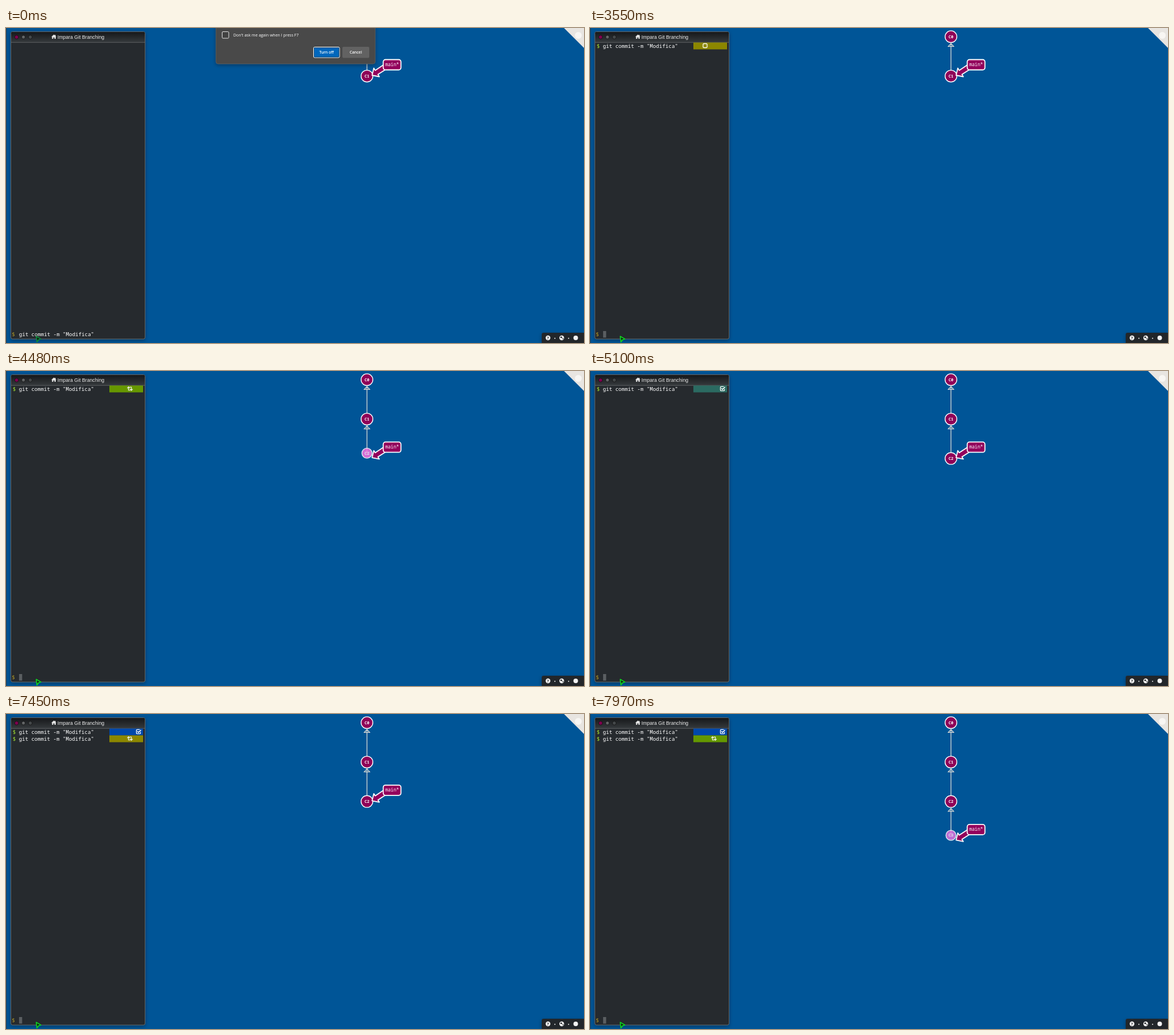
Animation, 1012 px wide and 553 px high, one loop 8 s. Source, as an HTML page:

```html
<!DOCTYPE html>
<html lang="it">
<head>
<meta charset="utf-8">
<title>Impara Git Branching</title>
<style>
  html, body { margin: 0; width: 100%; height: 100%; overflow: hidden; background: #005597; }
  svg { display: block; width: 1012px; height: 553px; }
  text { white-space: pre; }
  .mono { font: 500 9.13px "Noto Sans Mono", "DejaVu Sans Mono", monospace; fill: #fff; }
  .tag { font-size: 8px; text-anchor: middle; }
  .commit { font-size: 7px; font-weight: 700; text-anchor: middle; }
  .title { font: 8.7px "Liberation Sans", Arial, sans-serif; fill: #eee; }
  .ui { font: 7px "Open Sans", "Noto Sans", sans-serif; fill: #fff; }
  .btn { font-size: 6.7px; font-weight: 600; text-anchor: middle; }
  .line { fill: none; stroke: #fff; stroke-width: 1.3; }
</style>
</head>
<body>
<svg viewBox="0 0 1012 553">
  <defs>
    <linearGradient id="bar" x2="0" y2="1">
      <stop offset="0" stop-color="#16181a"/>
      <stop offset="1" stop-color="#35393c"/>
    </linearGradient>
    <filter id="shadow" x="-20%" y="-20%" width="140%" height="150%">
      <feDropShadow dx="0" dy="2" stdDeviation="3" flood-opacity=".35"/>
    </filter>
    <g id="retweet" fill="none" stroke="#e8ead8" stroke-width="1.4">
      <path d="M-2.5-3V2.6H.6M-4.6-.8L-2.5-3.2L-.4-.8M2.5 3V-2.6H-.6M4.6 .8L2.5 3.2L.4 .8"/>
    </g>
    <rect id="square" class="line" x="-3.5" y="-3.5" width="7" height="7" rx="1.3"/>
    <g id="check" class="line">
      <path d="M3.4 .4V2.4Q3.4 3.6 2.2 3.6H-2.4Q-3.6 3.6-3.6 2.4V-2.4Q-3.6-3.6-2.4-3.6H2.2"/>
      <path d="M-2-.6L0 1.3L4.4-3" stroke-width="1.6"/>
    </g>
  </defs>

  <rect width="1012" height="553" fill="#005597"/>
  <rect width="1.5" height="553" fill="#1b4263"/>

  <g id="tree">
    <g id="edges"></g>
    <g id="nodes"></g>
    <g id="branch" stroke="#fff" stroke-width="1.8" stroke-linejoin="round">
      <path fill="#93005c" d="M641 83L644 70.5L646.4 74.4L662 64L666 72L651.2 81.6L653.6 85.5Z"/>
      <rect x="660.5" y="55.5" width="31" height="18" rx="4" fill="#93005c"/>
      <text class="mono tag" x="676" y="67" stroke="none">main*</text>
    </g>
  </g>

  <!-- terminal -->
  <rect x="8.5" y="6.5" width="235" height="539.5" rx="3" fill="#262a2d" stroke="#65686a" filter="url(#shadow)"/>
  <path d="M9 25V9Q9 7 11 7H241Q243 7 243 9V25Z" fill="url(#bar)"/>
  <path d="M9 25.3H243" stroke="#5c6062"/>
  <g stroke="#111" stroke-width=".8">
    <circle cx="18.5" cy="16" r="3.3" fill="#80004f"/>
    <circle cx="30.5" cy="16" r="3.3" fill="#55585a"/>
    <circle cx="42.5" cy="16" r="3.3" fill="#44484a"/>
  </g>
  <path d="M30.5 14.5V17M28.8 15.5H32.2" stroke="#777" stroke-width=".8"/>
  <path d="M79.3 15.6L83.8 11.5L85.6 13.1V12H86.8V14.2L88.4 15.6H87V19H84.8V16.5H82.8V19H80.6V15.6Z" fill="#e6e6e6"/>
  <text class="title" x="90" y="18.8">Impara Git Branching</text>
  <g id="log"></g>

  <text class="mono" x="10.2" y="541" style="fill:#b39a28">$</text>
  <text class="mono" id="prompt" x="22.7" y="541"></text>
  <rect id="caret" y="532" width="5.4" height="11.5" fill="#5a5e61"/>

  <path id="arrow" d="M53 541.3L61 546L57 547.4L54.2 551.2Z" fill="#101a12" stroke-width="1.8" stroke-linejoin="round"/>
  <path id="beam" d="M49.5 534.8Q52.5 534.8 52.9 536.5Q53.3 534.8 56.3 534.8M52.9 536V546M49.5 547.2Q52.5 547.2 52.9 545.5Q53.3 547.2 56.3 547.2" fill="none" stroke="#10c820" stroke-width="1.8"/>

  <!-- corner ribbon and footer -->
  <path d="M977 0H1012V35Z" fill="#e8e5e1"/>
  <circle cx="1002" cy="13" r="6" fill="#f8f6f3"/>
  <path d="M938 553V538Q938 535 941 535H1012V553Z" fill="#24282b" filter="url(#shadow)"/>
  <g fill="#f2f2f2">
    <circle cx="949" cy="544" r="4.2"/>
    <circle cx="973" cy="544" r="4.2"/>
    <circle cx="997.5" cy="544" r="4"/>
    <circle cx="961" cy="544.8" r="1"/>
    <circle cx="985" cy="544.8" r="1"/>
  </g>
  <text class="ui" x="949" y="546.6" style="fill:#24282b;font-weight:700;text-anchor:middle">?</text>
  <path d="M970.5 542L973 541.6L974 543.2L972.4 544.6L970.6 544ZM974.6 544.4L976.2 544L975.4 546.6L974.2 546.4Z" fill="#24282b"/>

  <g id="dialog">
    <rect x="367.5" y="-20" width="279" height="83" rx="4" fill="#4a4a4a" stroke="#5c5f62" stroke-width=".8" filter="url(#shadow)"/>
    <rect x="378.5" y="6.5" width="11.5" height="11.5" rx="1.5" fill="#424242" stroke="#e4e4e4"/>
    <text class="ui" x="398" y="15">Don't ask me again when I press F7</text>
    <rect x="538.5" y="33.5" width="45.5" height="18.5" rx="2" fill="#0067bd" stroke="#fff"/>
    <rect x="539.5" y="34.5" width="43.5" height="16.5" rx="1" fill="none" stroke="#24405a" stroke-width=".8"/>
    <rect x="589" y="33" width="47" height="19.5" rx="2" fill="#626262"/>
    <text class="ui btn" x="561.2" y="45.3">Turn off</text>
    <text class="ui btn" x="612.4" y="45.3">Cancel</text>
  </g>
</svg>

<script>
const LOOP = 8000, X = 632, TOP = 15.2, GAP = 69.2, RADIUS = 10.3;
const CHAR = 5.478, COMMAND = 'git commit -m "Modifica"';
const MAIN = [143, 0, 88];
const OLIVE = [140, 135, 0], GREEN = [100, 152, 0], BLUE = [0, 72, 170];

const $ = id => document.getElementById(id);
const make = (parent, tag, attrs, text = '') => {
  const el = document.createElementNS('http://www.w3.org/2000/svg', tag);
  set(el, attrs);
  el.textContent = text;
  return parent.appendChild(el);
};
const set = (el, attrs) => {
  for (const key in attrs) el.setAttribute(key, attrs[key]);
};
const show = (el, on) => { el.style.display = on ? '' : 'none'; };
const clamp = v => Math.min(1, Math.max(0, v));
const mix = (a, b, p) => a + (b - a) * p;
const blend = (a, b, p) => `rgb(${a.map((v, i) => Math.round(mix(v, b[i], p)))})`;
const easeInOut = p => p < .5 ? 2 * p * p : 1 - 2 * (1 - p) ** 2;
const nodeY = i => TOP + GAP * i;

function bounce(p) {
  const s = 7.5625, d = 2.75;
  if (p < 1 / d) return s * p * p;
  if (p < 2 / d) return s * (p - 1.5 / d) ** 2 + .75;
  if (p < 2.5 / d) return s * (p - 2.25 / d) ** 2 + .9375;
  return s * (p - 2.625 / d) ** 2 + .984375;
}

// Screen refreshes: [first, last, count]
const BURSTS = [[3990, 4710, 10], [4800, 5350, 8], [7450, 7970, 8]];
function sample(t) {
  for (const [first, last, count] of BURSTS) {
    const step = (last - first) / (count - 1);
    if (t >= first && t < last + step) {
      return first + step * Math.min(count - 1, Math.floor((t - first) / step + .2));
    }
  }
  return t;
}

// Commits made during the loop
const runs = [
  { enter: 3550, start: 3990, birth: 3935, done: 4800, tint: [249, 114, 223] },
  { enter: 6980, start: 7450, birth: 7438, done: 8800, tint: [223, 116, 221] }
];

const nodes = [], edges = [];
for (let i = 0; i < 4; i++) {
  const group = make($('nodes'), 'g', {});
  const circle = make(group, 'circle', { cx: X, stroke: '#fff', 'stroke-width': 1.4 });
  const label = make(group, 'text', { class: 'mono commit', x: X }, 'C' + i);
  nodes.push({ group, circle, label });
  if (i) edges.push(make($('edges'), 'path', { fill: 'none', stroke: '#dedbd5', 'stroke-width': 1.3 }));
}

const rows = runs.map((run, i) => {
  const group = make($('log'), 'g', { transform: `translate(0 ${i * 12})` });
  const prompt = make(group, 'text', { class: 'mono', x: 11.7, y: 34.7 }, '$');
  prompt.style.fill = '#a4e432';
  make(group, 'text', { class: 'mono', x: 22.5, y: 34.7 }, COMMAND);
  const status = make(group, 'rect', { x: 181, y: 25.5, width: 59, height: 12 });
  const icons = [['square', 201.5], ['retweet', 217], ['check', 232]].map(([name, x]) =>
    make(group, 'use', { href: '#' + name, transform: `translate(${x} 31)` }));
  return { group, status, icons };
});

function drawNode(i, y, size, opacity, fill) {
  const { group, circle, label } = nodes[i];
  set(group, { opacity });
  set(circle, { cy: y, r: RADIUS * size, fill });
  set(label, { y: y + 2.5 });
}

function drawEdge(i, childY, opacity) {
  const tip = nodeY(i - 1) + 12, end = Math.max(tip, childY - 8);
  set(edges[i - 1], {
    opacity,
    d: `M${X} ${end}V${tip}L${X - 4.7} ${tip + 5.2}H${X + 4.7}L${X} ${tip}`
  });
}

function drawRun(run, i, t) {
  const at = i + 2, age = t - run.birth, born = t >= run.start;
  const p = born ? bounce(clamp(age / 800)) : 0;
  const move = born ? easeInOut(clamp(age / 400)) : 0;
  const y = from => mix(nodeY(at - 1), nodeY(at), from);
  drawNode(at, y(p), p, p, blend(run.tint, MAIN, clamp((t - run.done) / 300)));
  drawEdge(at, y(move), move);

  const { group, status, icons } = rows[i];
  const stage = t >= run.done ? 2 : born ? 1 : 0;
  show(group, t >= run.enter);
  icons.forEach((icon, k) => show(icon, k === stage));
  set(status, {
    fill: stage === 2
      ? blend(GREEN, BLUE, clamp((t - run.done) / 550))
      : blend(OLIVE, GREEN, clamp((t - run.start) / 500))
  });
  return move;
}

function render(now) {
  const t = sample(now % LOOP);
  drawNode(0, nodeY(0), 1, 1, blend(MAIN, MAIN, 0));
  drawNode(1, nodeY(1), 1, 1, blend(MAIN, MAIN, 0));
  drawEdge(1, nodeY(1), 1);
  const moved = runs.reduce((sum, run, i) => sum + drawRun(run, i, t), 0);
  set($('branch'), { transform: `translate(0 ${GAP * moved})` });

  const typed = t < 3550 || (t >= 5580 && t < 6980);
  const overText = (t >= 1380 && t < 3550) || (t >= 5660 && t < 7070);
  $('prompt').textContent = typed ? COMMAND : '';
  set($('caret'), { x: 22.9 + (typed ? COMMAND.length * CHAR : 0) });
  show($('caret'), t >= 1380);
  show($('dialog'), t < 1380);
  show($('beam'), overText);
  show($('arrow'), !overText);
  set($('arrow'), { stroke: t < 1380 ? '#0d8a3c' : '#10d020' });
}

const origin = performance.now();
(function tick() {
  render(performance.now() - origin);
  requestAnimationFrame(tick);
})();
</script>
</body>
</html>
```
